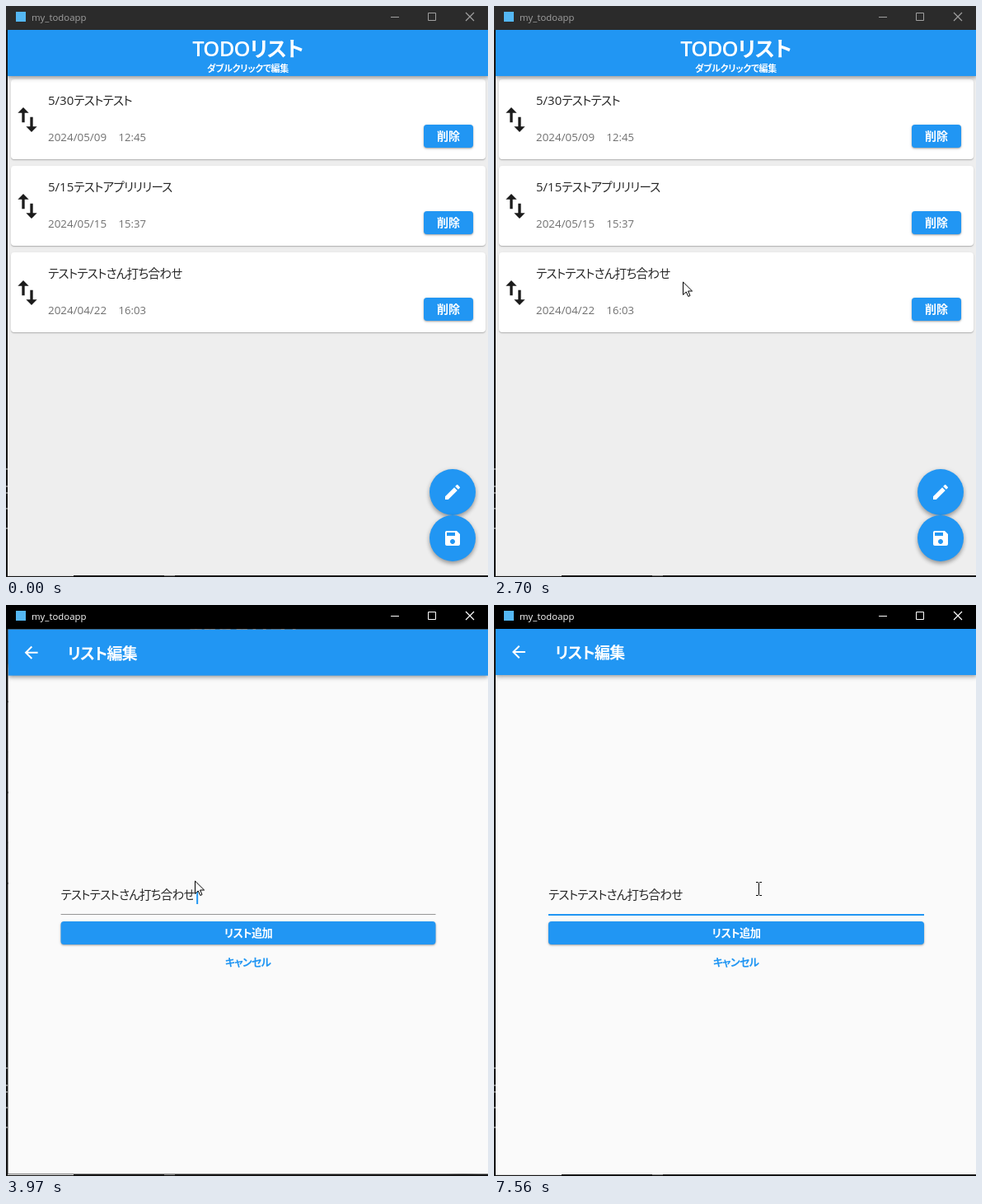
Write an HTML page that moves like this. It is 585x693 px and loops after 8000 ms.

```html
<!DOCTYPE html>
<html lang="ja">
<head>
<meta charset="utf-8">
<title>my_todoapp</title>
<style>
html, body { margin: 0; width: 100%; height: 100%; overflow: hidden; background: #141414; }
#stage { position: absolute; left: 0; top: 0; width: 585px; height: 693px; overflow: hidden;
  font-family: "Open Sans", "Noto Sans CJK JP", "Noto Sans CJK", sans-serif;
  font-feature-settings: "palt"; color: #262626; }
#stage div, svg { position: absolute; }
#win { left: 0; top: 0; width: 586px; height: 693px; clip-path: inset(29px 0 2px 2px); }
.page { left: 0; top: 0; width: 586px; height: 693px; transform-origin: 294px 360px;
  clip-path: inset(29px 0 2px 2px); }
#list { background: #eee; }
#edit { background: #fafafa; }
#scrim { left: 0; top: 0; width: 586px; height: 693px; background: #000; }
.t { line-height: 40px; white-space: pre; }
.mid { width: 300px; text-align: center; }
.bold { font-weight: 700; }
.white { color: #fff; }
.head { left: 2px; top: 29px; width: 584px; height: 56px; background: #2196f3;
  box-shadow: 0 2px 4px -1px #0003, 0 3px 5px #00000024, 0 1px 8px #0000001f; }
.card { left: 6px; width: 576px; height: 97px; border-radius: 4px; background: #fff;
  box-shadow: 0 1px 1px #00000030, 0 1px 3px #0000001a; }
.btn { height: 28px; border-radius: 4px; background: #2196f3;
  box-shadow: 0 1px 2px #0000004d, 0 1px 4px #0000001a; }
.fab { left: 514px; width: 56px; height: 56px; border-radius: 50%; background: #2196f3;
  box-shadow: 0 3px 5px #0000004d, 0 1px 6px #0000001a; }
#line { left: 66px; top: 375px; width: 456px; }
#caret { top: 341px; width: 2px; height: 22px; background: #2196f3; }
#bar { left: 0; top: 0; width: 585px; height: 29px; }
#logo { left: 12px; top: 7px; width: 12px; height: 12px; background: #54b7f3; }
#ring { left: 217px; top: 322px; width: 24px; height: 24px; border-radius: 50%; background: #ff0; opacity: .5; }
.speck { left: 0; width: 2px; height: 2px; background: #777; }
</style>
</head>
<body>
<div id="stage">
  <div id="win">
    <div id="list" class="page"></div>
    <div id="scrim"></div>
    <div id="edit" class="page"></div>
  </div>
  <div id="bar">
    <div id="logo"></div>
    <svg width="585" height="29" fill="none" stroke="currentColor">
      <path d="M467 13.5h10M512.5 8.5h9v9h-9z"/>
      <path d="M558 8l10 10M568 8l-10 10" stroke-width="1.2"/>
    </svg>
  </div>
  <div id="ring"></div>
  <svg id="arrow" width="14" height="21" fill="#fff" stroke="#000">
    <path d="M.5 1v15.5L4.3 13l2.5 5.5 2.2-1L6.6 12h5z"/>
  </svg>
  <svg id="beam" width="11" height="18" fill="none" stroke="#000">
    <path d="M2 .5h2.500l1 1 1-1H9M5.500 1.500v14M2 16.500h2.500l1-1 1 1H9"/>
  </svg>
</div>
<script>
const LOOP = 8000;
const $ = id => document.getElementById(id);

const text = (x, y, size, str, cls = '', css = '') =>
  `<div class="t ${cls}" style="left:${x}px;top:${y - 20}px;font-size:${size}px;${css}">${str}</div>`;
const centred = (x, y, size, str, cls, css) => text(x - 150, y, size, str, 'mid bold ' + cls, css);
const icon = (x, y, size, color, d) =>
  `<svg style="left:${x}px;top:${y}px" width="${size}" height="${size}" viewBox="0 0 24 24" fill="${color}"><path d="${d}"/></svg>`;
const button = (x, y, w, size, label, gap = 0) =>
  `<div class="btn" style="left:${x}px;top:${y}px;width:${w}px"></div>` +
  centred(x + w / 2, y + 14, size, label, 'white', `letter-spacing:${gap}px`);

const SWAP = 'M16 17.01V10h-2v7.01h-3L15 21l4-3.99h-3zM9 3L5 6.99h3V14h2V6.99h3L9 3z';
const PEN = 'M3 17.25V21h3.75L17.81 9.94l-3.75-3.75L3 17.25zM20.71 7.04c.39-.39.39-1.02 0-1.41l-2.34-2.34c-.39-.39-1.02-.39-1.41 0l-1.83 1.83 3.75 3.75 1.83-1.83z';
const DISK = 'M17 3H5c-1.11 0-2 .9-2 2v14c0 1.1.89 2 2 2h14c1.1 0 2-.9 2-2V7l-4-4zm-5 16c-1.66 0-3-1.34-3-3s1.34-3 3-3 3 1.34 3 3-1.34 3-3 3zm3-10H5V5h10v4z';
const BACK = 'M20 11H7.83l5.59-5.59L12 4l-8 8 8 8 1.41-1.41L7.83 13H20v-2z';
const TIGHT = 'letter-spacing:-.7px';

const items = [
  ['5/30', 'テストテスト', '2024/05/09', '12:45'],
  ['5/15', 'テストアプリリリース', '2024/05/15', '15:37'],
  ['', 'テストテストさん打ち合わせ', '2024/04/22', '16:03'],
];

const card = ([day, name, date, time], i) => {
  const y = 89 + i * 105;
  const lead = `<span style="font-size:15px;letter-spacing:0">${day}</span>`;
  return `<div class="card" style="top:${y}px"></div>` +
    icon(6, y + 29, 40, '#1c1c1c', SWAP) +
    text(51, y + 25, 14.5, lead + name, '', TIGHT) +
    text(51, y + 70, 13.4, date, '', 'color:#707070') +
    text(136.5, y + 70, 13.1, time, '', 'color:#707070') +
    button(507, y + 55, 60, 14, '削除');
};

$('list').innerHTML = items.map(card).join('') +
  '<div class="head"></div>' +
  centred(293.5, 51, 25.5, 'TODOリスト', 'white', 'font-weight:600;letter-spacing:-.8px') +
  centred(293.5, 76, 11, 'ダブルクリックで編集', 'white', 'letter-spacing:-.3px') +
  '<div class="fab" style="top:562px"></div><div class="fab" style="top:618px"></div>' +
  icon(530, 578, 24, '#fff', PEN) + icon(530, 634, 24, '#fff', DISK);

$('edit').innerHTML = '<div class="head"></div>' +
  icon(18, 45, 24, '#fff', BACK) +
  text(74, 58, 19, 'リスト編集', 'bold white', 'letter-spacing:-.7px') +
  text(66, 352, 14.5, items[2][1], '', TIGHT) +
  '<div id="line"></div><div id="caret"></div>' +
  button(66, 383.5, 456, 13.3, 'リスト追加', -.6) +
  centred(293.5, 433, 13, 'キャンセル', '', 'color:#2196f3;letter-spacing:-.9px');

$('bar').insertAdjacentHTML('beforeend', text(31, 14, 11.4, 'my_todoapp'));

// Faint edges of the desktop behind the window
const strip = (x, w, h, color) =>
  `<div style="left:${x}px;top:691px;width:${w}px;height:${h}px;background:${color}"></div>`;
$('stage').insertAdjacentHTML('beforeend',
  [561, 582, 590, 609, 633].map(y => `<div class="speck" style="top:${y}px"></div>`).join('') +
  strip(2, 80, 1, '#d8d8d8') + strip(192, 13, 1, '#777'));

// Pointer moves: start, end, steps, target x, target y
const moves = [
  [520, 520, 1, 358, 566], [590, 590, 1, 311, 412], [650, 720, 2, 329, 520],
  [1120, 1670, 9, 145, 240], [1740, 1870, 3, 169, 242], [1940, 1940, 1, 176, 237],
  [2010, 2010, 1, 183, 246], [2080, 2290, 4, 205, 334], [2560, 2700, 3, 229, 334],
  [4300, 4300, 1, 212, 340], [4370, 4840, 8, 83, 344], [4900, 4970, 2, 89, 345],
  [5040, 5100, 2, 321, 340], [5300, 5370, 2, 321, 344],
];
const clicks = [[3490, 3560], [3630, 3700]];
const caretOn = [[3764, 4240], [4770, 5300], [5840, 6570], [7030, 7560]];
const zoomTicks = [3770, 3830, 3900, 3970, 4040, 4110];
const ZOOM_AT = 3764, ZOOM_MS = 300;

const within = (spans, t) => spans.some(([a, b]) => t >= a && t < b);
const clamp = v => Math.min(1, Math.max(0, v));
const show = (el, on) => { el.style.visibility = on ? 'visible' : 'hidden'; };

function pointer(t) {
  let x = 0, y = 0;
  for (const [a, b, n, tx, ty] of moves) {
    if (t < a) break;
    const gap = (b - a) / Math.max(1, n - 1);
    const k = gap ? Math.min(n, Math.floor((t - a) / gap + 1e-6) + 1) : n;
    const u = k / n, e = u * u * (3 - 2 * u);
    x += (tx - x) * e;
    y += (ty - y) * e;
  }
  return [Math.round(x), Math.round(y)];
}

function bezier(x1, y1, x2, y2, x) {
  const at = (s, a, b) => 3 * (1 - s) * (1 - s) * s * a + 3 * (1 - s) * s * s * b + s * s * s;
  let lo = 0, hi = 1;
  for (let i = 0; i < 24; i++) {
    const m = (lo + hi) / 2;
    if (at(m, x1, x2) < x) lo = m; else hi = m;
  }
  return at(lo, y1, y2);
}

const zoomCurve = p => p < 1 / 6
  ? .4 * bezier(.05, 0, .1333, .06, p * 6)
  : .4 + .6 * bezier(.2083, .82, .25, 1, (p - 1 / 6) * 1.2);

function drawPages(t) {
  const tick = zoomTicks.filter(z => z <= t).pop() || 0;
  const p = clamp((tick - ZOOM_AT) / ZOOM_MS);
  const z = p === 0 ? 0 : p === 1 ? 1 : zoomCurve(p);
  const moving = p > 0 && p < 1;
  show($('list'), p < 1);
  $('list').style.transform = moving ? `scale(${1 + .05 * z})` : 'none';
  $('scrim').style.opacity = moving ? .6 * clamp((p - .2075) / .21) : 0;
  $('edit').style.opacity = clamp((p - .125) / .125);
  $('edit').style.transform = moving ? `scale(${.85 + .15 * z})` : 'none';
}

function draw(t) {
  const focused = t >= 3490;
  $('bar').style.background = focused ? '#000' : '#2b2b2b';
  $('bar').style.color = focused ? '#fff' : '#a0a0a0';
  drawPages(t);

  const active = t >= 4110, half = t >= 4040;
  $('line').style.height = active ? '2px' : half ? '1.5px' : '1px';
  $('line').style.background = active ? '#2196f3' : half ? '#5b95c0' : '#949494';
  $('caret').style.left = (t < 6040 ? 231 : 236) + 'px';
  $('caret').style.opacity = within(caretOn, t) ? 1 : 0;

  const [x, y] = pointer(t), typing = t >= 4300;
  show($('ring'), within(clicks, t));
  show($('arrow'), t >= 520 && !typing);
  show($('beam'), typing);
  $('arrow').style.transform = `translate(${x}px,${y}px)`;
  $('beam').style.transform = `translate(${x - 5}px,${y - 8}px)`;
}

for (const id of ['arrow', 'beam']) Object.assign($(id).style, { left: 0, top: 0 });
const start = performance.now();
function loop() {
  draw((performance.now() - start) % LOOP);
  requestAnimationFrame(loop);
}
loop();
</script>
</body>
</html>
```
